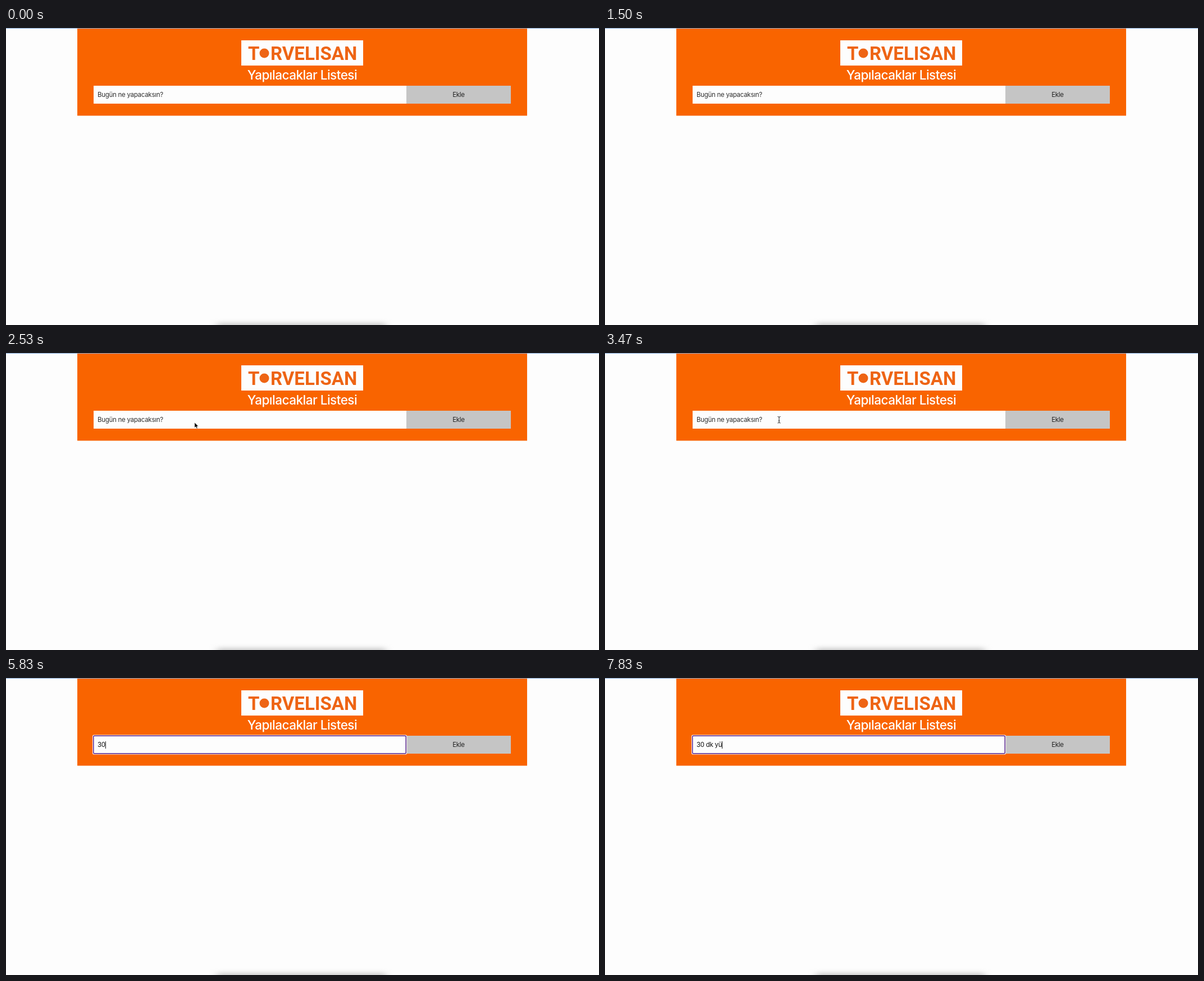
An HTML page that plays this animation: 1056 px wide and 530 px high, repeating every 8 s.

```html
<!DOCTYPE html>
<html lang="tr">
<head>
<meta charset="utf-8">
<style>
html, body { margin: 0; width: 100%; height: 100%; overflow: hidden; background: #fdfdfd; }
svg { display: block; }
text { font: 400 11.5px Inter, "Open Sans", sans-serif; letter-spacing: -.28px; white-space: pre; fill: #222; }
.title { font-size: 22.5px; font-weight: 500; letter-spacing: -.5px; fill: #fff; text-anchor: middle; }
.brand { font: 700 33px Roboto, sans-serif; letter-spacing: 0; fill: #ee6414; }
</style>
</head>
<body>
<svg width="1056" height="530" viewBox="0 0 1056 530">
  <defs>
    <filter id="blur" x="-20%" y="-200%" width="140%" height="500%"><feGaussianBlur stdDeviation="7 4"/></filter>
  </defs>
  <rect width="1056" height="530" fill="#fdfdfd"/>
  <rect x="376" y="527" width="300" height="12" fill="#c6c6c6" filter="url(#blur)"/>
  <rect x="127" width="801" height="156.5" fill="#f96400"/>
  <rect width="1056" height="1" fill="#7ba4d6"/>

  <rect x="419" y="22" width="217" height="45" fill="#fdfdfd"/>
  <text class="brand" x="431" y="57">T</text>
  <circle cx="460" cy="45" r="8.5" fill="#ee6414"/>
  <text class="brand" x="471" y="57">RVELISAN</text>
  <text class="title" x="527.5" y="92">Yapılacaklar Listesi</text>

  <rect x="156" y="103" width="557" height="32" fill="#fdfdfd"/>
  <rect x="713" y="103" width="186" height="32" fill="#c5c5c5"/>
  <text x="806" y="123.3" text-anchor="middle">Ekle</text>
  <g id="ring">
    <rect x="154" y="101.5" width="560" height="35" rx="2.5" fill="#fdf3f6"/>
    <rect x="155.75" y="103.25" width="556.5" height="31.5" rx="1.5" fill="#fdfdfd" stroke="#55258c" stroke-width="1.5"/>
  </g>
  <text id="field" x="163" y="123.3"></text>
  <rect id="caret" y="113" width="1" height="13" fill="#111"/>

  <path id="arrow" d="M0 0V9.6L2.2 7.6 3.7 11 5.4 10.3 4 7H6.9Z" fill="#000" stroke="#fff" stroke-width=".7"/>
  <path id="beam" d="M-2.5-5.5Q0-5.5 0-4Q0-5.5 2.5-5.5M0-4V4.5M-2.5 6Q0 6 0 4.5Q0 6 2.5 6M-1.2 2H1.2" fill="none" stroke="#222"/>
</svg>
<script>
const LOOP = 8000, FOCUS = 3800, BLINK = 500;
const $ = id => document.getElementById(id);
const [ring, field, caret, arrow, beam] = ["ring", "field", "caret", "arrow", "beam"].map($);
const phrase = "30 dk yü";
const keys = [5330, 5600, 6600, 6700, 6830, 7100, 7470, 7700];
// pointer path: time, x, y
const path = [[2330, 400, 300], [2530, 336, 124], [2800, 310, 119]];

const show = (el, on) => el.setAttribute("visibility", on ? "visible" : "hidden");

function pointer(t) {
  for (let i = 1; i < path.length; i++) {
    const [t0, x0, y0] = path[i - 1], [t1, x1, y1] = path[i];
    if (t < t1) {
      const k = 1 - (1 - (t - t0) / (t1 - t0)) ** 2;
      return [x0 + (x1 - x0) * k, y0 + (y1 - y0) * k];
    }
  }
  return path[path.length - 1].slice(1);
}

function draw(t) {
  const typed = keys.filter(k => k <= t).length;
  const text = typed ? phrase.slice(0, typed) : "Bugün ne yapacaksın?";
  if (field.textContent !== text) field.textContent = text;
  field.style.fill = typed ? "#111" : "#303030";

  const focused = t >= FOCUS;
  const lastInput = typed ? keys[typed - 1] : FOCUS;
  show(ring, focused);
  show(caret, focused && (t - lastInput) % (2 * BLINK) < BLINK);
  caret.setAttribute("x", 163 + (typed ? field.getComputedTextLength() : 0));

  const visible = t >= path[0][0] && !typed;
  const place = `translate(${visible ? pointer(t) : "0,0"})`;
  const overField = t > 2600;
  show(arrow, visible && !overField);
  show(beam, visible && overField);
  arrow.setAttribute("transform", place);
  beam.setAttribute("transform", place);
}

const start = performance.now();
function tick() {
  draw((performance.now() - start) % LOOP);
  requestAnimationFrame(tick);
}
tick();
</script>
</body>
</html>
```
